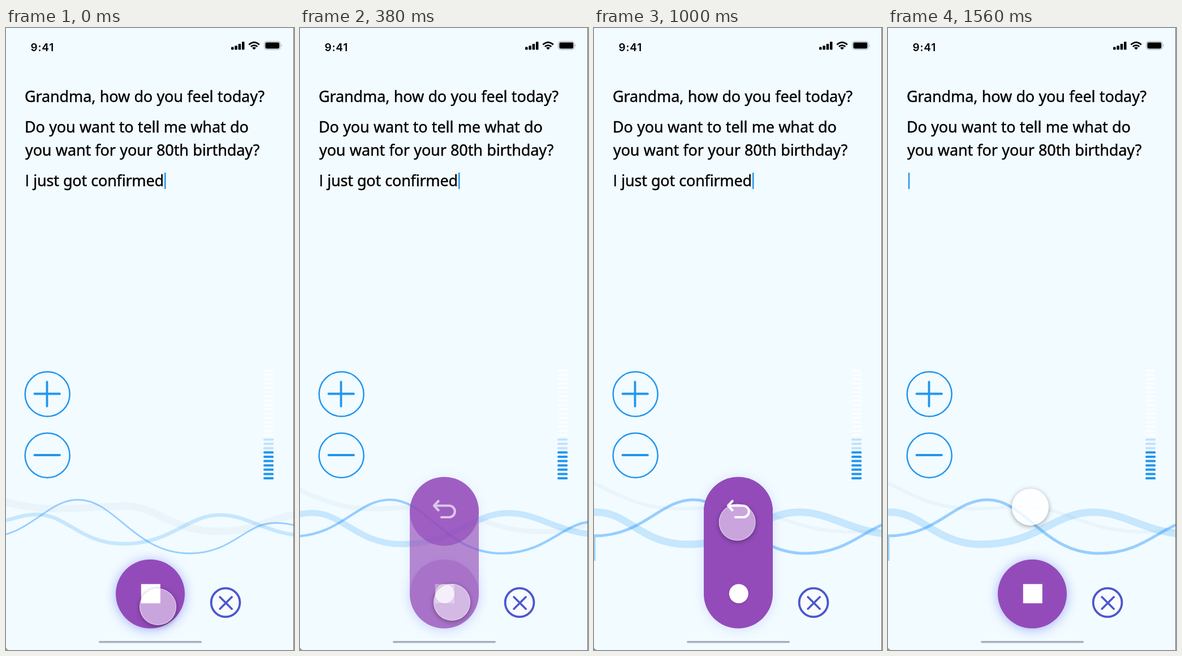
Write an HTML page that moves like this. It is 509 px wide and 1101 px high and loops after 1.58 s.

```html
<!DOCTYPE html>
<html lang="en">
<head>
<meta charset="utf-8">
<title>Voice message</title>
<style>
  html, body { margin: 0; width: 100%; height: 100%; overflow: hidden; background: #f2fbff; }
  svg { position: absolute; left: 0; top: 0; display: block; }
  .copy {
    font: 400 27px "Noto Sans", sans-serif; letter-spacing: -.13px; word-spacing: .5px;
    fill: #000; stroke: #000; stroke-width: .4px;
  }
  .clock { font: 600 19px Inter, sans-serif; letter-spacing: .8px; fill: #000; }
  .line { fill: none; stroke-linecap: round; stroke-linejoin: round; }
  .blue { stroke: #2196f0; }
  .caret { fill: #2196f0; }
  .purple { fill: #944bba; }
  #dot { filter: drop-shadow(0 1px 2px rgba(60, 0, 90, .2)); }
  #touch {
    position: absolute; left: -32.5px; top: -32.5px; width: 65px; height: 65px;
    box-sizing: border-box; border-radius: 50%;
    border: 1.2px solid rgba(255, 255, 255, .5);
    box-shadow: 0 2px 8px rgba(0, 0, 0, .36);
  }
</style>
</head>
<body>
<svg width="509" height="1101" viewBox="0 0 509 1101">
  <rect width="509" height="1101" fill="#f2fbff"/>

  <text class="clock" x="43.5" y="40.5">9:41</text>
  <g id="signal"></g>
  <path class="line" stroke="#000" stroke-width="2.7" style="stroke-linecap:butt"
    d="M429.3 29.6Q438.5 21.2 447.7 29.6M432.7 33.1Q438.5 28 444.3 33.1"/>
  <path d="M435 35Q438.5 32.4 442 35L438.5 38.6Z"/>
  <rect x="456.5" y="23.8" width="28.5" height="14.4" rx="4" fill="none" stroke="#a3a9ac"/>
  <rect x="458.3" y="25.5" width="24.9" height="11" rx="2.4"/>
  <path d="M486.5 28.6Q488.8 31 486.5 33.4Z" fill="#a3a9ac"/>

  <g id="kept" class="copy">
    <text x="33" y="131">Grandma, how do you feel today?</text>
    <text x="33" y="185">Do you want to tell me what do</text>
    <text x="34" y="226">you want for your 80th birthday?</text>
  </g>
  <g id="undone">
    <text class="copy" x="33.6" y="280" style="letter-spacing:-.22px"><tspan font-family="Open Sans, sans-serif">I</tspan> just got confirmed</text>
    <rect class="caret" x="280" y="256" width="2.5" height="29"/>
  </g>
  <rect id="caret" class="caret" x="35.8" y="256" width="2.5" height="29"/>

  <g class="line blue" stroke-width="2.5">
    <circle cx="73.2" cy="648" r="39.5"/>
    <circle cx="73.2" cy="756.5" r="39.5"/>
    <path stroke-width="3.8" d="M50.5 647.5H95M72.5 626.5V669.5M50.5 756H95"/>
  </g>
  <g id="meter"></g>

  <g id="waves" class="line" style="stroke-linecap:butt"></g>

  <circle id="top" class="purple" cx="255" cy="855.7" r="61"/>
  <path id="disc" class="purple"/>
  <path id="pill" class="purple"/>
  <path id="undo" class="line" stroke="#fff" stroke-width="4.2" d="M244.5 837.5L237 845.5L244.5 853.5M237 845.5H263.5A10.2 10.2 0 0 1 263.5 866H250"/>
  <rect id="stop" x="238.8" y="984.3" width="34" height="34" fill="#fff"/>
  <circle id="dot" cx="255.8" cy="1001.3" r="17" fill="#fff"/>

  <g class="line" stroke="#4c57cf">
    <circle cx="388" cy="1017" r="25.4" stroke-width="3.8" fill="#f8fcff"/>
    <path stroke-width="3.6" d="M378.1 1007.2L399.1 1028.2M399.1 1007.2L378.1 1028.2"/>
  </g>
  <rect x="164" y="1085" width="182" height="3.6" rx="1.8" fill="#a9aebb"/>
  <rect x="508" width="1" height="1101" fill="#60666a"/>
  <path d="M0 1096Q1 1100 5 1101H0Z" fill="#90969a"/>
</svg>
<div id="touch"></div>

<script>
const LOOP = 1580;
const $ = id => document.getElementById(id);
const mix = (a, b, p) => a + (b - a) * p;
const span = (t, a, b) => Math.min(1, Math.max(0, (t - a) / (b - a)));
const smooth = u => u * u * (3 - 2 * u);
const cubic = u => u < .5 ? 4 * u ** 3 : 1 - 4 * (1 - u) ** 3;

function add(parent, tag, attrs) {
  const el = document.createElementNS("http://www.w3.org/2000/svg", tag);
  for (const k in attrs) el.setAttribute(k, attrs[k]);
  return parent.appendChild(el);
}

[5, 7.2, 10.5, 14.2].forEach((h, i) =>
  add($("signal"), "rect", { x: 398 + i * 6.3, y: 38.5 - h, width: 4.5, height: h, rx: 1.2 }));

for (let i = 0; i < 26; i++) {
  const fill = i < 7 ? "#2196f0" : i < 10 ? "#c3e1fb" : "#fbfeff";
  add($("meter"), "rect", { x: 455, y: 795 - i * 7.62, width: 18, height: 4, rx: 1.6, fill });
}

// Each wave: crests and troughs at rest and while dragging, plus both line widths.
const waves = [
  { color: "#e9f4fb", width: [13, 6],
    from: [[-60, 830], [90, 851], [210, 846], [375, 891], [525, 861]],
    to: [[-60, 792], [150, 851], [240, 847], [455, 892], [570, 880]] },
  { color: "rgba(44,160,246,.22)", width: [6.5, 13],
    from: [[-60, 880], [55, 861], [208, 913], [378, 862], [540, 899]],
    to: [[-120, 880], [5, 857], [165, 914], [362, 857], [545, 897]] },
  { color: "rgba(26,144,255,.42)", width: [2.8, 5], tail: true,
    from: [[-40, 902], [127, 835], [325, 930], [475, 876], [600, 895]],
    to: [[0, 899], [176, 835], [373, 930], [545, 872], [640, 890]] }
];
for (const w of waves) w.el = add($("waves"), "path", { stroke: w.color });

// Crests are tighter than troughs.
const CREST = .34, TROUGH = .5;
function drawWave(w, p) {
  const pts = w.from.map(([x, y], i) => [mix(x, w.to[i][0], p), mix(y, w.to[i][1], p)]);
  let d = w.tail ? `M${pts[0][0]} 943V${pts[0][1]}` : `M${pts[0]}`;
  for (let i = 1; i < pts.length; i++) {
    const [x0, y0] = pts[i - 1], [x1, y1] = pts[i], dx = x1 - x0;
    const [h0, h1] = y0 < y1 ? [CREST, TROUGH] : [TROUGH, CREST];
    d += `C${x0 + dx * h0} ${y0} ${x1 - dx * h1} ${y1} ${x1} ${y1}`;
  }
  w.el.setAttribute("d", d);
  w.el.setAttribute("stroke-width", mix(...w.width, p));
}

// Cubic segments as [start, control, control, end]; angles run clockwise from the top.
const CX = 255, R = 61, HIGH = 855.7, LOW = 1001.8;
function arc(cy, a, b) {
  const k = 4 / 3 * Math.tan((b - a) * Math.PI / 720);
  const at = (deg, dir) => {
    const r = deg * Math.PI / 180, s = Math.sin(r), c = Math.cos(r);
    return [CX + R * (s + dir * k * c), cy + R * (-c + dir * k * s)];
  };
  return [at(a, 0), at(a, 1), at(b, -1), at(b, 0)];
}
const side = (x, y0, y1) => [0, 1 / 3, 2 / 3, 1].map(u => [x, mix(y0, y1, u)]);
const pillShape = [
  arc(HIGH, 0, 90), side(CX + R, HIGH, LOW), arc(LOW, 90, 180),
  arc(LOW, 180, 270), side(CX - R, LOW, HIGH), arc(HIGH, 270, 360)
];
const stops = [0, 90, 180, 225, 270, 300, 360];
const discShape = stops.slice(1).map((b, i) => arc(LOW, stops[i], b));

function shape(p) {
  const seg = pillShape.map((s, i) =>
    s.map((pt, j) => pt.map((v, n) => mix(v, discShape[i][j][n], p).toFixed(2))));
  return `M${seg[0][0]}` + seg.map(s => `C${s.slice(1).join(" ")}`).join("") + "Z";
}
const glow = alpha => `drop-shadow(0 2px 10px rgba(70,80,240,${alpha}))`;
$("disc").setAttribute("d", shape(1));
$("disc").style.filter = glow(.44);

function render(t) {
  const press = smooth(span(t, 0, 200));
  const open = smooth(span(t, 200, 500));
  const close = smooth(span(t, 1305, 1550));
  const fade = (id, o) => { $(id).style.opacity = o; };

  waves.forEach(w => drawWave(w, open));

  fade("disc", 1 - open);
  fade("pill", open);
  fade("top", open * (1 - close));
  fade("undo", open);
  fade("stop", close || 1 - open);
  fade("dot", open * (1 - close));
  $("pill").setAttribute("d", shape(close));
  $("pill").style.filter = glow(mix(.16, .44, close * close));

  fade("kept", 1 - close * (1 - close));
  fade("undone", 1 - close);
  fade("caret", close);

  const x = mix(268, 251, smooth(span(t, 540, 1110)));
  const y = mix(mix(1024, 1016, press), 847.5, cubic(span(t, 580, 1220)));
  $("touch").style.transform = `translate(${x}px,${y}px)`;
  $("touch").style.background = `rgba(255,255,255,${mix(.5, .8, close ** 4)})`;
}

function tick() {
  render(performance.now() % LOOP);
  requestAnimationFrame(tick);
}
tick();
</script>
</body>
</html>
```
